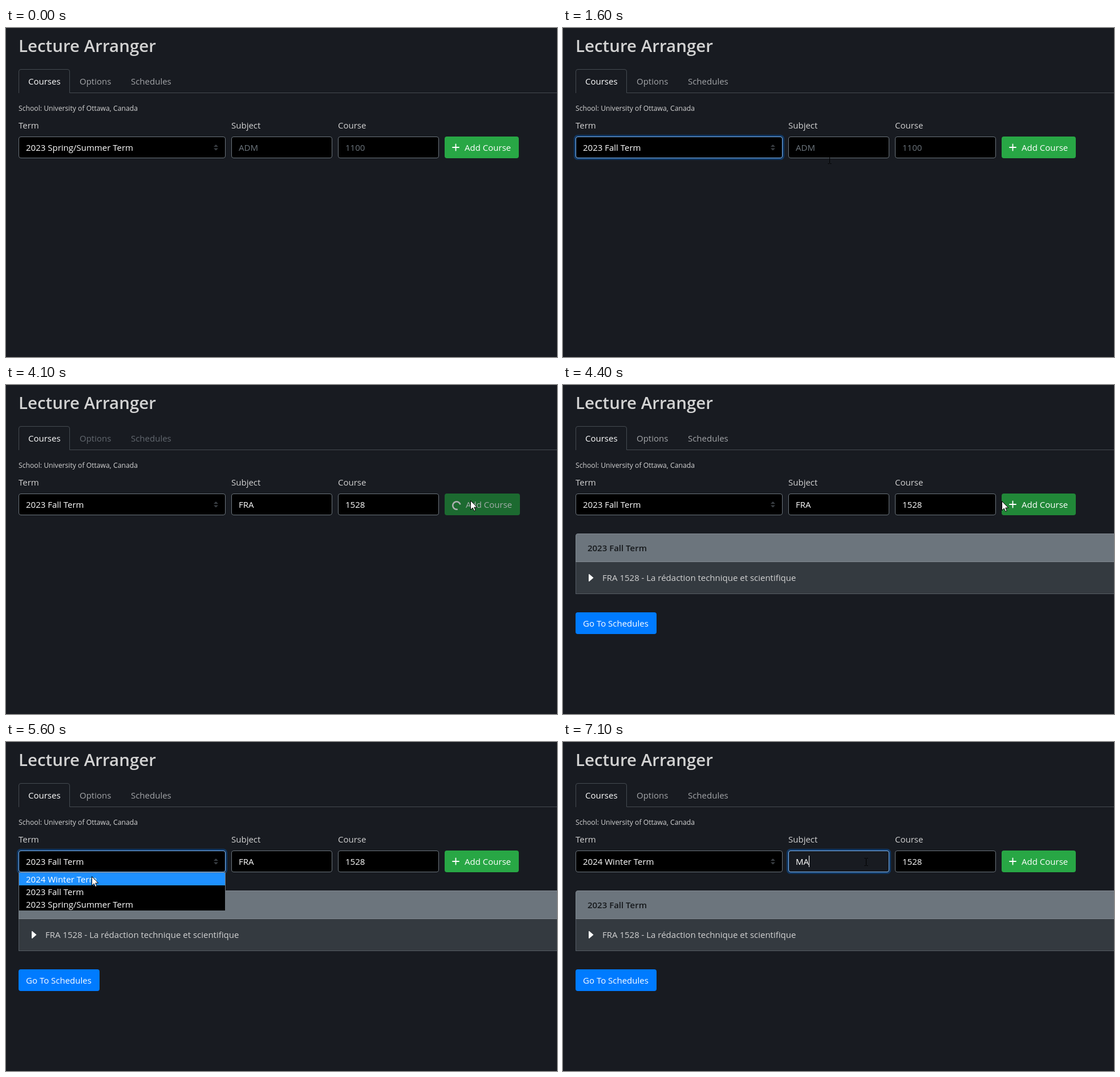
These frames come from a looping animation (966x576 px, 7.2 s). An HTML page:

```html
<!DOCTYPE html>
<html lang="en">
<head>
<meta charset="utf-8">
<title>Lecture Arranger</title>
<style>
  html, body { margin: 0; width: 100%; height: 100%; overflow: hidden; background: #181b21; }
  svg { display: block; width: 966px; height: 576px; }
  text { font: 15px "Open Sans", "Noto Sans", sans-serif; white-space: pre; }
  .title { font-size: 29.5px; font-weight: 600; }
  .small { font-size: 12.2px; }
  .bold { font-weight: 600; }
</style>
</head>
<body>
<svg id="stage" viewBox="0 0 966 576"></svg>
<script>
const LOOP = 7200, STEP = 100;
const BG = '#181b21', GREY = '#6c757d', BODY = '#d3d3d3';
const TERMS = ['2024 Winter Term', '2023 Fall Term', '2023 Spring/Summer Term'];

// Pointer stops: time, x, y
const PATH = [
  [100, 330, 572], [600, 236, 226], [800, 230, 214], [900, 230, 214],
  [1200, 190, 258], [1300, 190, 258], [1600, 467, 231], [1800, 485, 213],
  [2200, 485, 213], [2400, 633, 217], [3200, 633, 217], [3700, 814, 202],
  [4300, 814, 202], [4900, 207, 214], [5000, 207, 214], [5600, 150, 235],
  [5700, 150, 235], [6200, 531, 210]
];

// Field contents: time, value
const TERM = [[0, 2], [1300, 1], [5700, 0]];
const SUBJECT = [[0, ''], [1900, 'F'], [2000, 'FR'], [2200, 'FRA'], [6900, 'M'], [7000, 'MA']];
const COURSE = [[0, ''], [2800, '1'], [2900, '15'], [3000, '152'], [3100, '1528']];

const stage = document.getElementById('stage');
const ruler = document.createElement('canvas').getContext('2d');
const clamp = v => Math.max(0, Math.min(1, v));
const during = (t, a, b) => t >= a && t < b;
const valueAt = (steps, t) => steps.filter(s => s[0] <= t).pop()[1];
const focusAt = (t, a, b) => clamp((t - a) / 150) * (1 - clamp((t - b) / 150));

function textWidth(s) {
  ruler.font = '15px "Open Sans", "Noto Sans", sans-serif';
  return ruler.measureText(s).width;
}

function pointerAt(t) {
  if (t < PATH[0][0]) return null;
  const i = PATH.findIndex(p => p[0] > t);
  if (i < 0) return PATH[PATH.length - 1].slice(1);
  const [t0, x0, y0] = PATH[i - 1], [t1, x1, y1] = PATH[i];
  const u = (t - t0) / (t1 - t0), k = u * u * (3 - 2 * u);
  return [x0 + (x1 - x0) * k, y0 + (y1 - y0) * k];
}

const text = (x, y, s, fill = BODY, cls = '') =>
  `<text x="${x}" y="${y}" fill="${fill}" class="${cls}">${s}</text>`;
const rect = (x, y, w, h, fill, extra = '') =>
  `<rect x="${x}" y="${y}" width="${w}" height="${h}" fill="${fill}" ${extra}/>`;
const path = (d, fill, extra = '') => `<path d="${d}" fill="${fill}" ${extra}/>`;

function box(x, w, focus, focusFill) {
  let s = rect(x + .5, 190.5, w - 1, 37, '#000', `rx="3.5" stroke="${GREY}"`);
  if (focus > 0) {
    s += `<g opacity="${focus}">`
      + rect(x - 1.5, 188.5, w + 3, 41, 'none', 'rx="5" stroke="#007bff" stroke-opacity=".3" stroke-width="3"')
      + rect(x + .5, 190.5, w - 1, 37, focusFill, 'rx="3.5" stroke="#80bdff"') + '</g>';
  }
  return s;
}

function field(x, value, hint, focus, caret, selected) {
  const w = textWidth(value);
  let s = box(x, 177, focus, BG);
  if (selected) s += rect(x + 13, 199, w, 20, '#0078d7');
  s += text(x + 13, 215, value || hint, value ? '#fff' : GREY);
  if (caret) s += rect(Math.round(x + 13 + w), 199, 1, 20, '#fff');
  return s;
}

function header(loading) {
  const tab = loading ? '#62686f' : '#a3a5a8';
  return text(22, 42, 'Lecture Arranger', BODY, 'title')
    + path('M22.5 114V76a3.5 3.5 0 0 1 3.5-3.5H108a3.5 3.5 0 0 1 3.5 3.5V113.5H966', 'none', 'stroke="#454b51"')
    + text(39, 99, 'Courses', '#fff') + text(129, 99, 'Options', tab) + text(219, 99, 'Schedules', tab)
    + text(22, 145, 'School: University of Ottawa, Canada', BODY, 'small')
    + text(22, 176, 'Term') + text(395, 176, 'Subject') + text(582, 176, 'Course');
}

function addButton(t, loading, hover) {
  if (!loading) {
    return rect(769, 190, 130, 38, hover ? '#218838' : '#28a745', 'rx="4"')
      + path('M788.5 203.5V214.5M783 209H794', 'none', 'stroke="#fff" stroke-width="1.8" stroke-linecap="round"')
      + text(804, 215, 'Add Course', '#fff');
  }
  const turn = 30 + (t - 4100) / 750 * 360;
  return rect(769, 190, 132, 38, '#1c6a30', 'rx="4"')
    + path('M4.7 4.7A6.7 6.7 0 1 1 4.7 -4.7', 'none',
      `stroke="#adafb1" stroke-width="2.6" transform="translate(790 211) rotate(${turn})"`)
    + text(806, 215, 'Add Course', '#a3adaa');
}

function results() {
  return path('M22.5 310V264a3.5 3.5 0 0 1 3.5 -3.5H970V310Z', GREY, 'stroke="#7f878e"')
    + rect(22.5, 309.5, 950, 56, '#343a40', 'stroke="#565d64"')
    + rect(22, 309, 944, 1, '#7f878e')
    + text(43, 291, TERMS[1], '#15181b', 'bold')
    + path('M45 331.5L46 331L53.5 337.5L46 344L45 343.5Z', '#fff')
    + text(69, 343, 'FRA 1528 - La rédaction technique et scientifique')
    + rect(22, 398, 142, 38, '#007bff', 'rx="4"')
    + text(35, 423, 'Go To Schedules', '#fff');
}

function menu(chosen, pointer) {
  const row = Math.floor((pointer[1] - 229) / 22);
  const lit = row >= 0 && row < 3 ? row : chosen;
  return rect(22.5, 228.5, 362, 67, '#000', `stroke="${GREY}"`)
    + TERMS.map((name, i) => (i === lit ? rect(23, 229 + i * 22, 361, 22, '#1e90ff') : '')
      + text(35, 246 + i * 22, name, '#fff')).join('');
}

function cursor([x, y]) {
  const overField = y > 188 && y < 233 && (x > 394 && x < 573 || x > 581 && x < 760);
  const at = `transform="translate(${Math.round(x)} ${Math.round(y)})"`;
  return overField
    ? path('M-2.5 -6.5H-.5L.5 -5.5L1.5 -6.5H3.5M.5 -5.5V5.5M-2.5 6.5H-.5L.5 5.5L1.5 6.5H3.5', 'none', `stroke="#000" ${at}`)
    : path('M.5 .5V16.5L4.2 13L6.7 18.5L9.2 17.4L6.8 12H11.8Z', '#fff', `stroke="#000" ${at}`);
}

function draw(t) {
  const pointer = pointerAt(t);
  const loading = during(t, 3800, 4400);
  const hover = pointer && pointer[0] > 769 && pointer[0] < 899 && pointer[1] > 190 && pointer[1] < 228;
  const term = valueAt(TERM, t);
  const open = during(t, 900, 1300) || during(t, 5000, 5700);
  const termFocus = Math.max(focusAt(t, 850, 1800), focusAt(t, 4970, 6600));
  const subjectFocus = Math.max(focusAt(t, 1750, 2600), focusAt(t, 6550, LOOP));
  const courseFocus = focusAt(t, 2550, 3750);

  stage.innerHTML = rect(0, 0, 966, 576, BG)
    + header(loading)
    + box(22, 363, termFocus, '#000')
    + text(35, 215, TERMS[term], '#fff')
    + path('M364 208L368 204L372 208ZM364 210.5H372L368 214.5Z', '#3a3f44')
    + field(395, valueAt(SUBJECT, t), 'ADM', subjectFocus,
      during(t, 1800, 2600) || t >= 6900, during(t, 6600, 6900))
    + field(582, valueAt(COURSE, t), '1100', courseFocus, during(t, 2600, 3600), false)
    + addButton(t, loading, hover)
    + (t >= 4400 ? results() : '')
    + (open ? menu(term, pointer) : '')
    + (pointer ? cursor(pointer) : '');
}

const start = performance.now();
let shown = -1;
function tick() {
  const t = Math.floor((performance.now() - start) % LOOP / STEP) * STEP;
  if (t !== shown) draw(shown = t);
  requestAnimationFrame(tick);
}
tick();
</script>
</body>
</html>
```
